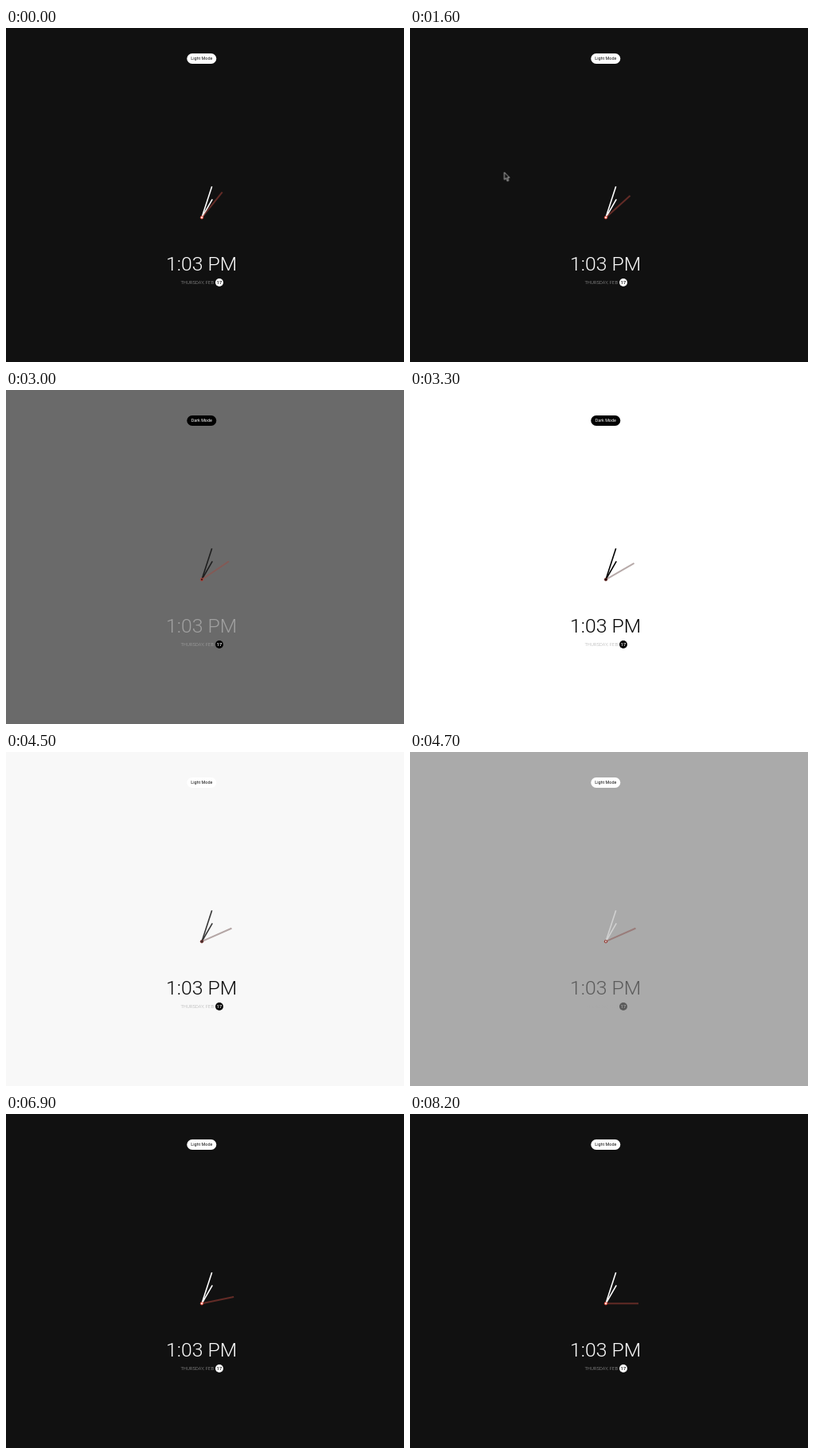
Write an HTML page that moves like this. It is 500x420 px and loops after 8.8 s.

```html
<!DOCTYPE html>
<html lang="en">
<head>
<meta charset="utf-8">
<title>Theme clock</title>
<style>
  html, body { margin: 0; width: 100%; height: 100%; overflow: hidden; background: #111; }
  svg { display: block; width: 500px; height: 420px; font-family: Roboto, Arial, sans-serif; }
  text { text-anchor: middle; }

  svg, .time, .needle, .second, .ring, .core, .badge, .day, .go-light, .go-dark, .cursor {
    animation: 8.8s linear infinite;
  }

  svg { animation-name: page; }
  .time { font-size: 24.8px; font-weight: 300; animation-name: ink; }
  .date { font-size: 5.7px; font-weight: 300; letter-spacing: .1px; fill: #aaa; }
  .badge { animation-name: badge; }
  .day { font-size: 5.6px; font-weight: 500; animation-name: day; }
  .label { font-size: 5.4px; }
  .go-light { animation-name: dark-only; animation-timing-function: step-end; }
  .go-dark { animation-name: light-only; animation-timing-function: step-end; }

  .needle { stroke-width: 1.6; animation-name: needle; }
  .core { animation-name: core; }
  .second { stroke-width: 1; animation-name: second; }
  .ring { animation-name: ring; }
  .sweep { animation: tick 8.8s ease-in-out infinite; }
  .cursor { animation-name: move; }

  /* slow theme fade: light at 2725 ms, dark again at 4432 ms */
  @keyframes page {
    0%, 30.97% { background: #111; animation-timing-function: ease-in; }
    36.65%, 50.36% { background: #fff; animation-timing-function: ease-in; }
    56.05%, 100% { background: #111; }
  }
  @keyframes ink {
    0%, 30.97% { fill: #fff; animation-timing-function: ease-in; }
    36.65%, 50.36% { fill: #000; animation-timing-function: ease-in; }
    56.05%, 100% { fill: #fff; }
  }
  @keyframes second {
    0%, 30.97% { stroke: #b4443a; animation-timing-function: ease-in; }
    36.65%, 50.36% { stroke: #6f5553; animation-timing-function: ease-in; }
    56.05%, 100% { stroke: #b4443a; }
  }
  @keyframes ring {
    0%, 30.97% { fill: #e74c3c; animation-timing-function: ease-in; }
    36.65%, 50.36% { fill: #6b2a26; animation-timing-function: ease-in; }
    56.05%, 100% { fill: #e74c3c; }
  }
  @keyframes badge {
    0%, 30.68% { fill: #fff; }
    33.5%, 50.36% { fill: #000; animation-timing-function: ease-in; }
    56.05%, 100% { fill: #fff; }
  }
  @keyframes day {
    0%, 30.68% { fill: #111; }
    33.5%, 50.36% { fill: #fff; animation-timing-function: ease-in; }
    56.05%, 100% { fill: #111; }
  }

  /* quick theme fade */
  @keyframes needle {
    0%, 30.68% { stroke: #fff; }
    34.55%, 50.36% { stroke: #000; }
    54.09%, 100% { stroke: #fff; }
  }
  @keyframes core {
    0%, 30.68% { fill: #fff; }
    34.55%, 50.36% { fill: #000; }
    54.09%, 100% { fill: #fff; }
  }

  @keyframes dark-only {
    0% { opacity: 1; }
    30.66% { opacity: 0; }
    50.5%, 100% { opacity: 1; }
  }
  @keyframes light-only {
    0% { opacity: 0; }
    30.66% { opacity: 1; }
    50.5%, 100% { opacity: 0; }
  }

  @keyframes tick {
    0% { transform: rotate(38.8deg); animation-timing-function: ease-out; }
    2.84%, 9.77% { transform: rotate(42deg); }
    13.64%, 21.14% { transform: rotate(48deg); }
    25%, 32.5% { transform: rotate(54deg); }
    36.36%, 43.86% { transform: rotate(60deg); }
    47.73%, 55.23% { transform: rotate(66deg); }
    59.09%, 66.59% { transform: rotate(72deg); }
    70.45%, 77.95% { transform: rotate(78deg); }
    81.82%, 89.32% { transform: rotate(84deg); }
    93.18%, 100% { transform: rotate(90deg); }
  }

  @keyframes move {
    0%, 18.09% { opacity: 0; transform: translate(118.5px, 181.5px); }
    18.1%, 18.3% { opacity: 1; transform: translate(118.5px, 181.5px); animation-timing-function: ease-out; }
    21.5% { opacity: 1; transform: translate(242px, 39px); }
    21.51%, 100% { opacity: 0; transform: translate(242px, 39px); }
  }
</style>
</head>
<body>
<svg viewBox="0 0 500 420">
  <g class="go-light">
    <rect x="227.3" y="32" width="37" height="13" rx="6.5" fill="#fff"/>
    <text class="label" x="245.8" y="40.3" fill="#111">Light Mode</text>
  </g>
  <g class="go-dark">
    <rect x="227.3" y="32" width="37" height="13" rx="6.5" fill="#000"/>
    <text class="label" x="245.8" y="40.3" fill="#fff">Dark Mode</text>
  </g>

  <g transform="translate(246 238.3)">
    <path class="needle" d="M0 0V-26.5" transform="rotate(30)"/>
    <path class="needle" d="M0 0V-41" transform="rotate(18)"/>
    <g class="sweep"><path class="second" d="M0 0V-41"/></g>
    <circle class="ring" r="2.1"/>
    <circle class="core" r="1.1"/>
  </g>

  <text class="time" x="245.6" y="304.7">1:03 PM</text>
  <text class="date" x="240.2" y="322">THURSDAY, FEB</text>
  <circle class="badge" cx="268" cy="320" r="5"/>
  <text class="day" x="268" y="322">17</text>

  <path class="cursor" d="M0 0V9.2L2.2 7.2L3.8 11L5.4 10.3L3.8 6.7H6.6Z" fill="#111" stroke="#ddd" stroke-width=".8"/>
</svg>
</body>
</html>
```
